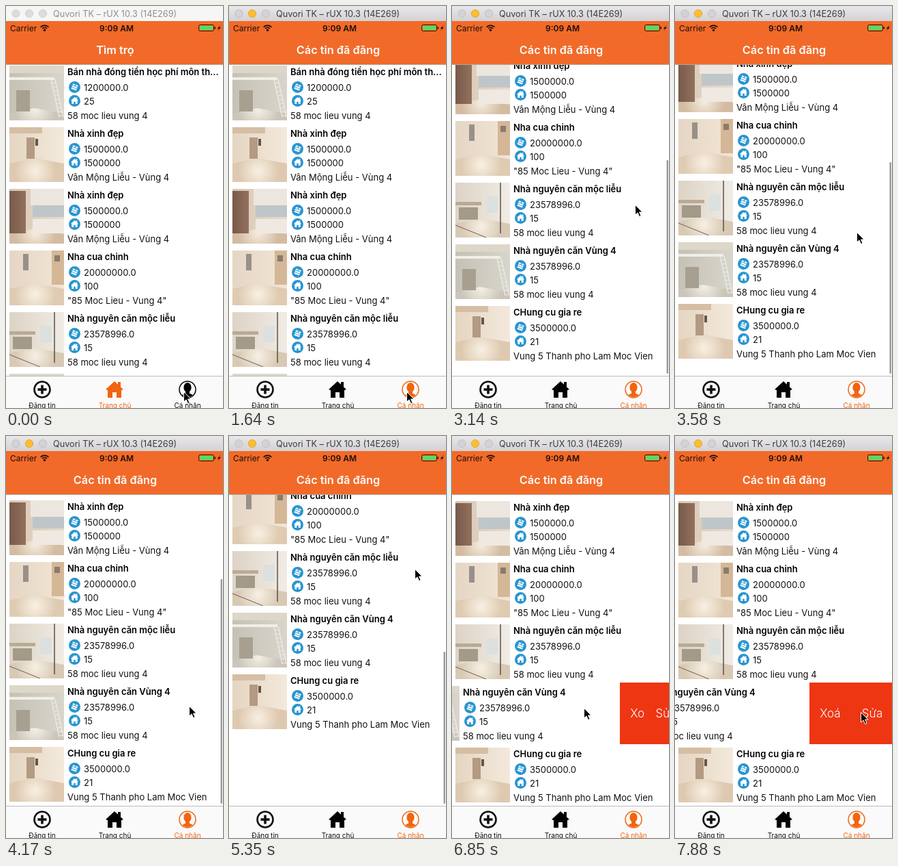
Recreate the animation shown at these times as an HTML page with a canvas. Size 318 px wide and 587 px high, loop 8 s.

```html
<!DOCTYPE html>
<html lang="vi">
<head>
<meta charset="utf-8">
<title>Tìm trọ</title>
<style>
  html, body { margin: 0; width: 100%; height: 100%; overflow: hidden; background: #fff; }
  canvas { display: block; width: 318px; height: 587px; }
</style>
</head>
<body>
<canvas id="stage"></canvas>
<script>
const W = 318, H = 587, LOOP = 8000;
const ORANGE = '#f26a29', ACTIVE = '#f2640f', BLUE = '#2895cf', RED = '#ee3612', INK = '#111';
const LIST_TOP = 86, TAB_TOP = 540, PITCH = 90, REST = 172, SWIPED_ROW = 5;
const canvas = document.getElementById('stage');
const g = canvas.getContext('2d');
const dpr = window.devicePixelRatio || 1;
canvas.width = W * dpr;
canvas.height = H * dpr;

const PLACE = '58 moc lieu vung 4', PLACE_2 = 'Vân Mộng Liễu - Vùng 4';
const rows = [
  [loft, 'Bán nhà đóng tiền học phí môn th...', '1200000.0', '25', PLACE],
  [hall, 'Nhà xinh đẹp', '1500000.0', '1500000', PLACE_2],
  [kitchen, 'Nhà xinh đẹp', '1500000.0', '1500000', PLACE_2],
  [corner, 'Nha cua chinh', '20000000.0', '100', '"85 Moc Lieu - Vung 4"'],
  [terrace, 'Nhà nguyên căn mộc liễu', '23578996.0', '15', PLACE],
  [loft, 'Nhà nguyên căn Vùng 4', '23578996.0', '15', PLACE],
  [hall, 'CHung cu gia re', '3500000.0', '21', 'Vung 5 Thanh pho Lam Moc Vien']
];

const stepAt = t => Math.floor((t - 1485) / 148.6);

// Straight moves between [step, value] points, held at both ends.
function track(step, points) {
  const i = points.findIndex(p => p[0] > step);
  if (i === 0) return points[0][1];
  if (i < 0) return points[points.length - 1][1];
  const [a, from] = points[i - 1], [b, to] = points[i];
  return Math.round(from + (to - from) * (step - a) / (b - a));
}

// Two overscroll drags that spring back, then a swipe on one row.
const scrollAt = k => track(k, [[4, 0], [8, 197], [10, 200], [12, 178], [14, 192], [15, 192],
  [18, 173], [23, REST], [26, 279], [27, 279], [31, REST]]);
const swipeAt = k => track(k, [[33, 0], [38, 123]]);
const cursorXAt = k => track(k, [[3, 260], [8, 270], [14, 266], [26, 272], [31, 258], [33, 257],
  [38, 150], [42, 237], [43, 272]]);
const cursorYAt = k => track(k, [[3, 563], [8, 282], [10, 276], [14, 330], [15, 330], [18, 394],
  [23, 420], [26, 194], [27, 194], [31, 392], [43, 403]]);

function rect(x, y, w, h, fill) {
  g.fillStyle = fill;
  g.fillRect(x, y, w, h);
}
function disc(x, y, r, fill) {
  g.fillStyle = fill;
  g.beginPath();
  g.arc(x, y, r, 0, 7);
  g.fill();
}
function ring(x, y, r, color, width, from = 0, to = 7) {
  g.beginPath();
  g.arc(x, y, r, from, to);
  g.strokeStyle = color;
  g.lineWidth = width;
  g.stroke();
}
function poly(points, fill) {
  g.beginPath();
  for (let i = 0; i < points.length; i += 2) g.lineTo(points[i], points[i + 1]);
  g.closePath();
  g.fillStyle = fill;
  g.fill();
}
function line(x1, y1, x2, y2, color, width) {
  g.beginPath();
  g.moveTo(x1, y1);
  g.lineTo(x2, y2);
  g.strokeStyle = color;
  g.lineWidth = width;
  g.stroke();
}
function at(x, y, scale, draw) {
  g.save();
  g.translate(x, y);
  g.scale(scale, scale);
  draw();
  g.restore();
}
function clipped(x, y, w, h, draw) {
  g.save();
  g.beginPath();
  g.rect(x, y, w, h);
  g.clip();
  draw();
  g.restore();
}
function label(str, x, y, size, color = INK, weight = 400, align = 'left') {
  g.font = `${weight} ${size}px Inter, sans-serif`;
  g.textAlign = align;
  g.fillStyle = color;
  g.fillText(str, x, y);
}
function blend(x, y, from, to) {
  const fill = g.createLinearGradient(0, 0, x, y);
  fill.addColorStop(0, from);
  fill.addColorStop(1, to);
  return fill;
}

// Photo stand-ins on an 80 x 80 tile: a lit wall, a glossy floor and a few blocks.
function room(shade, light, floor, horizon) {
  rect(0, 0, 80, 80, blend(80, 0, shade, light));
  poly([0, horizon + 8, 36, horizon, 80, horizon + 8, 80, 80, 0, 80], floor);
  const gloss = g.createRadialGradient(38, 64, 2, 38, 64, 30);
  gloss.addColorStop(0, 'rgba(255,250,240,.75)');
  gloss.addColorStop(1, 'rgba(255,250,240,0)');
  poly([0, horizon + 8, 36, horizon, 80, horizon + 8, 80, 80, 0, 80], gloss);
}
function loft() {
  room('#c5c1b5', '#d8d5cc', '#cbc6b9', 62);
  rect(0, 0, 80, 11, '#ddd7ca');
  rect(0, 17, 66, 4, '#f0eee6');
  rect(10, 36, 20, 31, '#a7a091');
  for (const x of [61, 67]) line(x, 20, x + 12, 75, '#eeece5', 1.2);
  for (let y = 26; y < 75; y += 6) line(62 + (y - 26) / 4.6, y, 69 + (y - 26) / 4.6, y - 1, '#eeece5', 1);
}
function hall() {
  room('#e5d5c1', '#f3e9dc', '#dec9b0', 45);
  rect(0, 0, 48, 9, '#d5bea4');
  rect(25, 15, 12, 31, '#b39a82');
  rect(38, 17, 4, 10, '#66564a');
}
function kitchen() {
  room('#d9c7b5', '#e7dacb', '#d3bca2', 58);
  rect(0, 3, 24, 62, blend(24, 0, '#79594a', '#92715d'));
  rect(31, 0, 49, 24, '#ece6de');
  rect(34, 24, 46, 17, '#bfc6c9');
  rect(34, 44, 46, 21, '#efe9e1');
}
function corner() {
  room('#e5d6c4', '#f1e5d5', '#dfcbb2', 48);
  rect(20, 5, 8, 24, '#98918a');
  rect(62, 0, 18, 50, '#d4b797');
  rect(66, 7, 8, 9, '#8a7b6b');
}
function terrace() {
  room('#ddd3c5', '#f0ece5', '#d8c9b4', 52);
  rect(0, 28, 38, 5, '#bbaa93');
  rect(5, 36, 28, 18, '#a39a87');
  rect(45, 20, 17, 24, '#dce0df');
  line(66, 0, 66, 74, '#5b5048', 1.5);
  line(0, 62, 45, 80, '#6f6052', 1);
}

function house(x, y, scale, color) {
  at(x, y, scale, () => {
    poly([0, -12, 13, 0, 10, 1, 10, 12, 3, 12, 3, 4, -3, 4, -3, 12, -10, 12, -10, 1, -13, 0], color);
    rect(5, -11, 4, 8, color);
  });
}

function cash(x, y) {
  at(x, y, 1, () => {
    g.rotate(0.35);
    for (let i = -1; i <= 1; i++) rect(-4, i * 3 - 1.2, 8, 2.1, '#fff');
    disc(0, -3, 1, BLUE);
  });
}

function drawRow([photo, title, price, area, place], x, y) {
  clipped(x + 5, y, 80, 80, () => at(x + 5, y, 1, photo));
  label(title, x + 90, y + 14, 13, '#000', 600);
  for (const dy of [31.5, 51.5]) disc(x + 100.5, y + dy, 8.5, BLUE);
  cash(x + 100.5, y + 31.5);
  house(x + 100.5, y + 51, 0.42, '#fff');
  label(price, x + 114, y + 37, 13);
  label(area, x + 114, y + 57, 13);
  label(place, x + 90, y + 78, 13);
}

function drawActions(y, swipe) {
  const left = 320 - swipe;
  clipped(left, y - 5, swipe, PITCH, () => {
    ['Xoá', 'Sửa'].forEach((name, i) => {
      const x = left + i * swipe / 2;
      rect(x, y - 5, swipe, PITCH, RED);
      label(name, x + 30.5, y + 46, 17, '#fff', 300, 'center');
    });
  });
}

function drawList(scroll, swipe) {
  clipped(0, LIST_TOP, W, TAB_TOP - LIST_TOP, () => rows.forEach((row, i) => {
    const y = LIST_TOP + 1 + i * PITCH - scroll;
    const shift = i === SWIPED_ROW ? swipe : 0;
    drawRow(row, -shift, y);
    if (shift) drawActions(y, shift);
  }));
}

function drawScrollbar(scroll) {
  const over = Math.max(0, scroll - REST);
  const top = 89 + 119 * Math.min(1, scroll / REST) + over;
  g.beginPath();
  g.roundRect(314.5, top, 2.5, 329 - over, 1.25);
  g.fillStyle = '#9a9a9a';
  g.fill();
}

function drawWindowBar(active) {
  rect(0, 0, W, 22, active ? blend(0, 22, '#e9e7e9', '#d3d1d3') : '#f6f6f6');
  [14.5, 34, 54].forEach((x, i) => {
    const yellow = active && i === 1;
    disc(x, 11, 5.6, yellow ? '#fdbd2f' : active ? '#d4d2d4' : '#dcdcdc');
    ring(x, 11, 5.6, yellow ? '#dfa023' : active ? '#bcbabc' : '#cbcbcb', 0.8);
  });
  label('Quvori TK – rUX 10.3 (14E269)', 69, 16, 12.7, active ? '#3c3c3c' : '#8f8f8f');
}

function drawHeader(title) {
  const dark = '#1c0f08';
  rect(0, 22, W, 63, ORANGE);
  rect(0, 85, W, 1, '#b3a59b');
  label('Carrier', 6, 37, 12, dark);
  for (const r of [4.5, 7.7]) ring(56.5, 36, r, dark, 1.7, -Math.PI * 0.77, -Math.PI * 0.23);
  disc(56.5, 35.2, 1.7, dark);
  label('9:09 AM', 162, 37, 12, dark, 600, 'center');
  g.beginPath();
  g.roundRect(282.5, 27.5, 22, 9, 2);
  g.strokeStyle = dark;
  g.lineWidth = 0.9;
  g.stroke();
  rect(284, 29, 19, 6, '#55db62');
  rect(305.5, 30.5, 1.5, 3, dark);
  at(312, 32, 0.9, () => poly([3, -5, -2.5, 1, 0, 1, -2, 5, 3, -1, 0.5, -1], dark));
  label(title, 160, 70, 16.3, '#fff', 600, 'center');
}

function person(x, y, color) {
  ring(x, y, 12, color, 1.5);
  g.save();
  g.beginPath();
  g.arc(x, y, 11, 0, 7);
  g.clip();
  g.fillStyle = color;
  g.beginPath();
  g.ellipse(x, y - 3, 5.6, 7, 0, 0, 7);
  g.rect(x - 3, y, 6, 7);
  g.ellipse(x, y + 12, 10, 6.5, 0, 0, 7);
  g.fill();
  g.restore();
}

function drawTabs(profile) {
  const y = 560;
  rect(0, TAB_TOP, W, H - TAB_TOP, '#fafafa');
  rect(0, TAB_TOP, W, 1, '#bcbcbc');
  ring(53, y, 11.5, INK, 2.6);
  line(46.5, y, 59.5, y, INK, 3.6);
  line(53, y - 6.5, 53, y + 6.5, INK, 3.6);
  house(159, y, 1, profile ? '#000' : ACTIVE);
  person(266, y, profile ? ACTIVE : '#000');
  ['Đăng tin', 'Trang chủ', 'Cá nhân'].forEach((name, i) => {
    const current = i === (profile ? 2 : 1);
    label(name, 53 + i * 106.5, 586.5, 10, current ? ACTIVE : INK, 400, 'center');
  });
}

function drawCursor(x, y) {
  at(x, y, 1, () => {
    poly([0.5, 0.5, 0.5, 15, 4, 11.8, 6.6, 17.6, 9, 16.5, 6.5, 11, 11, 11], '#000');
    g.strokeStyle = '#fff';
    g.lineWidth = 1;
    g.stroke();
  });
}

function draw(t) {
  const step = stepAt(t), scroll = scrollAt(step), profile = step >= 1;
  g.setTransform(dpr, 0, 0, dpr, 0, 0);
  rect(0, 0, W, H, '#fff');
  drawList(scroll, swipeAt(step));
  if (step >= 5 && step < 33) drawScrollbar(scroll);
  drawWindowBar(step >= 0);
  drawHeader(profile ? 'Các tin đã đăng' : 'Tìm trọ');
  drawTabs(profile);
  drawCursor(cursorXAt(step), cursorYAt(step));
}

function tick() {
  draw(performance.now() % LOOP);
  requestAnimationFrame(tick);
}
tick();
</script>
</body>
</html>
```
